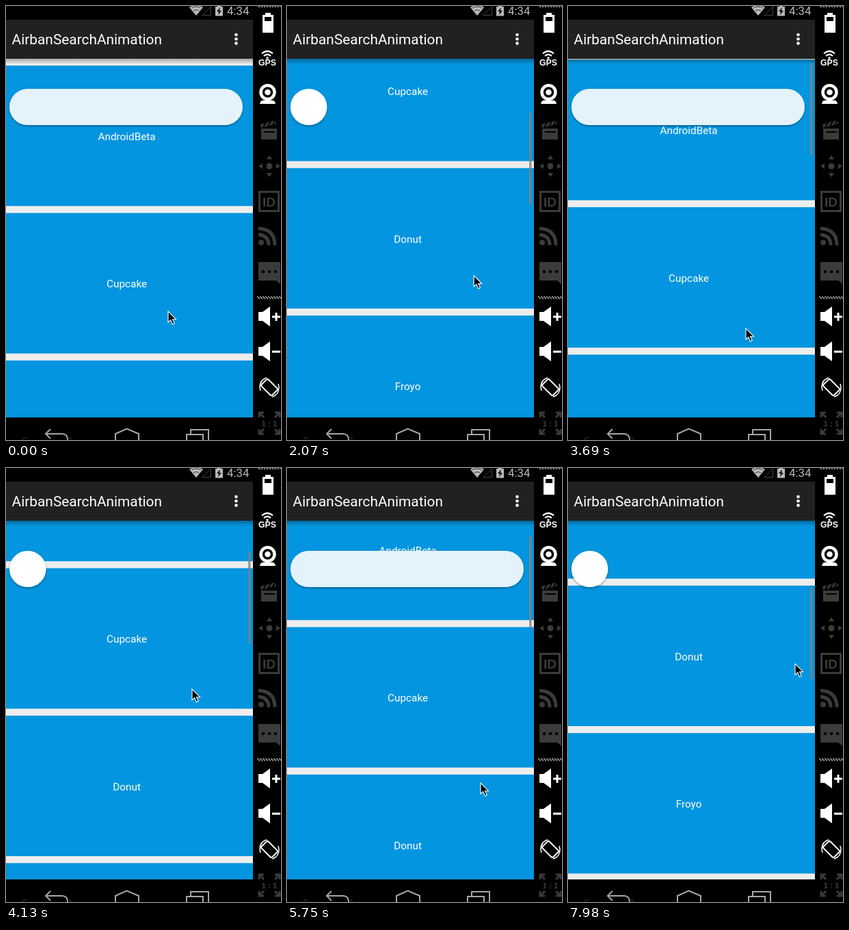
These frames come from a looping animation (402x634 px, 8000 ms). An HTML page:

```html
<!DOCTYPE html>
<html lang="en">
<head>
<meta charset="utf-8">
<title>Search bar animation</title>
<style>
  html, body { margin: 0; width: 100%; height: 100%; overflow: hidden; background: #000; }
  svg { display: block; width: 402px; height: 634px; }
  text { font-family: Roboto, sans-serif; fill: #fff; }
  .bold { font-family: "Liberation Sans", Arial, sans-serif; font-weight: bold; }
  .line { fill: none; stroke: #fff; }
  .dim { fill: #3b3b3b; }
  .dimLine { fill: none; stroke: #3b3b3b; }
</style>
</head>
<body>
<svg viewBox="0 0 402 634">
  <defs>
    <clipPath id="viewport"><rect y="77" width="361" height="524"/></clipPath>
    <linearGradient id="fade" x2="0" y2="1">
      <stop stop-opacity=".3"/><stop offset="1" stop-opacity="0"/>
    </linearGradient>
    <filter id="shadow" x="-10%" y="-20%" width="120%" height="150%">
      <feDropShadow dx="0" dy="1.5" stdDeviation="1.5" flood-opacity=".4"/>
    </filter>
    <pattern id="hatch" width="4" height="6" patternUnits="userSpaceOnUse" patternTransform="translate(367 423)">
      <path d="M0 1L4 5" stroke="#aaa" stroke-width="1.5"/>
    </pattern>
    <path id="speaker" d="M369 447h6l11-8v29l-11-8h-6z" fill="#fff"/>
  </defs>
  <rect width="402" height="634"/>

  <g clip-path="url(#viewport)">
    <rect y="77" width="361" height="524" fill="#ededed"/>
    <g id="list" text-anchor="middle" font-size="15.3"></g>
    <rect y="77" width="361" height="8" fill="url(#fade)"/>
    <rect id="bar" x="5" y="121" height="53" rx="26.5" filter="url(#shadow)"/>
    <rect id="thumb" x="354" width="3.6" height="134.5" fill="#808080" opacity=".75"/>
  </g>

  <!-- status bar and toolbar -->
  <rect y="20" width="361" height="57" fill="#212121"/>
  <text x="8.6" y="56" font-size="20.85">AirbanSearchAnimation</text>
  <g fill="#fff"><circle cx="336.5" cy="42" r="2.3"/><circle cx="336.5" cy="48.3" r="2.3"/><circle cx="336.5" cy="54.6" r="2.3"/></g>
  <text x="323" y="13" font-size="16.8" style="fill:#b9b9b9">4:34</text>
  <path d="M268 2Q278-4 288 2L278 14z" fill="#b9b9b9"/>
  <path d="M271 3Q278-1 285 3M274 7Q278 4 282 7" fill="none" stroke="#333"/>
  <path d="M287 13.500H299.500V1z" fill="none" stroke="#444"/>
  <path d="M306 1h3v-1h5v1h3v13.500h-11z" fill="#b9b9b9"/>
  <path d="M313 2l-5 6h3l-1 5 5-6h-3z"/>

  <!-- navigation keys -->
  <g fill="none" stroke="#a6a6a6" stroke-width="2">
    <path d="M65 618l-7 7 7 7M59 625h23q8 0 8 9"/>
    <path d="M160 634v-9l16.500-7.500 17.500 7.500v9"/>
    <path d="M264 634v-8h24v8M270 625v-6h26v15"/>
    <path d="M25 634v-3h6M90 631h5v3" stroke="#333" stroke-width="1"/>
  </g>

  <!-- emulator side panel -->
  <rect x="367" y="423" width="35" height="6" fill="url(#hatch)"/>
  <rect x="367" y="423" width="35" height="6" fill="url(#hatch)" transform="translate(0 -426)"/>
  <path d="M375 13h4v-3h8v3h4v26h-16z" fill="#fff"/><path d="M378 16h10v6h-10z"/>
  <g class="line" stroke-width="2.200"><path d="M374 69.500q8-7 16 0M377 73q5-4.500 10 0"/><circle cx="382" cy="76" r=".7"/></g>
  <text class="bold" x="382" y="87.300" font-size="12.300" text-anchor="middle">GPS</text>
  <circle cx="382.500" cy="126" r="10" class="line" stroke-width="4.500"/><circle cx="382.500" cy="126" r="4.300" fill="#fff"/>
  <path d="M371 143q1-6 7-5h9q6-1 7 5z" fill="#fff"/>
  <g class="dim">
    <path d="M373 179h23v16h-23zM372 173l22-6 1 5-22 6z"/>
    <circle cx="385" cy="234" r="4.500"/>
    <path d="M385 218l4 6h-8zM385 250l4-6h-8zM369 234l6-4v8zM401 234l-6-4v8z"/>
    <circle cx="373" cy="345.500" r="4"/>
    <path d="M369 374h32v32l-6-5h-26z"/>
  </g>
  <path d="M376 177l4-6M383 175l4-6M390 173l4-6M377 184h16" stroke="#000" stroke-width="2"/>
  <rect x="370.500" y="271.500" width="28" height="28" class="dimLine" stroke-width="3"/>
  <text class="bold" x="384.500" y="292.500" font-size="19" text-anchor="middle" style="fill:#3b3b3b">ID</text>
  <path d="M369 334q15 1 15 15.500M369 325q24 1 24 24.500" class="dimLine" stroke-width="5"/>
  <g><circle cx="376" cy="388" r="2.300"/><circle cx="385" cy="388" r="2.300"/><circle cx="394" cy="388" r="2.300"/></g>
  <use href="#speaker"/><use href="#speaker" y="51"/>
  <path d="M389 454h12M395 448v12M389 505h12" class="line" stroke-width="3"/>
  <g class="line" stroke-width="2">
    <rect x="378" y="546" width="14" height="22" rx="2" transform="rotate(-45 385 557)"/>
    <path d="M371 557q0-11 10-14M399 557q0 11-10 14M372 562l-1-5M398 552l1 5" stroke-width="1.500"/>
  </g>
  <g class="dimLine" stroke-width="3">
    <path d="M370 601v-7h7M393 594h7v7M370 618v7h7M393 625h7v-7M371 595l6 6M399 595l-6 6M371 624l6-6M399 624l-6-6"/>
  </g>
  <text class="bold" x="385" y="613.500" font-size="11.500" text-anchor="middle" style="fill:#3b3b3b">1 : 1</text>

  <path id="cursor" d="M0 0V16L3.700 12.600 6.500 19 9.200 17.800 6.500 11.700H11.500z" stroke="#fff" stroke-width="1.100"/>
</svg>
<script>
const LOOP = 8000, STEP = 147.7, ROW = 215.4;
const byId = id => document.getElementById(id);

// Keys are [step, value, ...]; the screen refreshes once per step.
const scrollKeys = [
  [0, 0], [1, 4], [2, 11], [3, 37], [7, 93], [8, 104], [9, 118], [10, 175], [13, 215],
  [14, 281], [16, 300], [17, 390], [18, 456], [19, 430], [21, 225], [23, 30], [24, 0],
  [25, 8.5], [28, 156], [32, 803], [33, 817], [34, 740], [35, 620], [36, 410],
  [37, 200], [38, 70], [39, 0], [40, 0], [41, 8], [45, 108], [46, 108], [47, 116],
  [50, 160], [54, 346]
];
const cursorKeys = [
  [0, 237, 446], [3, 244, 409], [7, 258, 354], [10, 270, 300], [13, 268, 430], [18, 294, 249],
  [22, 280, 440], [24, 261, 479], [25, 260, 471], [28, 272, 323], [30, 270, 440],
  [32, 281, 323], [34, 285, 260], [38, 283, 460], [39, 282, 447], [40, 282, 447],
  [45, 292, 339], [46, 292, 339], [47, 293, 331], [50, 302, 296], [52, 322, 415], [54, 332, 286]
];
const barKeys = [
  [0, 1], [2, 1], [5, 0], [20, 0], [23, 1], [25, 1], [28, 0], [34, 0], [37, 1], [41, 1], [44, 0], [54, 0]
];

function sample(keys, step) {
  const next = keys.findIndex(key => key[0] > step);
  if (next < 0) return keys.at(-1).slice(1);
  const a = keys[next - 1], b = keys[next];
  const p = (step - a[0]) / (b[0] - a[0]);
  return a.slice(1).map((value, i) => value + (b[i + 1] - value) * p);
}

const names = ["AndroidBeta", "Cupcake", "Donut", "Froyo", "Gingerbread", "Honeycomb", ""];
byId("list").innerHTML = names.map((name, i) => `<g transform="translate(0 ${i * ROW})">
  <rect y="87" width="361" height="205.2" fill="#0395df"/>
  <text x="176.6" y="195.8">${name}</text></g>`).join("");

function draw(time) {
  const step = Math.floor((time % LOOP + 9) / STEP);
  const [scroll] = sample(scrollKeys, step);
  const [x, y] = sample(cursorKeys, step);
  const [open] = sample(barKeys, step);
  const width = 53.5 + 287.5 * open * open * (3 - 2 * open);

  byId("list").setAttribute("transform", `translate(0 ${-scroll})`);
  byId("thumb").setAttribute("y", 80.5 + 0.269 * scroll);
  byId("thumb").setAttribute("visibility", step ? "visible" : "hidden");
  byId("bar").setAttribute("width", width);
  byId("bar").setAttribute("fill", `rgb(${255 - 27 * open} ${255 - 12 * open} ${255 - 4 * open})`);
  byId("cursor").setAttribute("transform", `translate(${x} ${y})`);
}

const start = performance.now();
function tick() {
  draw(performance.now() - start);
  requestAnimationFrame(tick);
}
tick();
</script>
</body>
</html>
```
